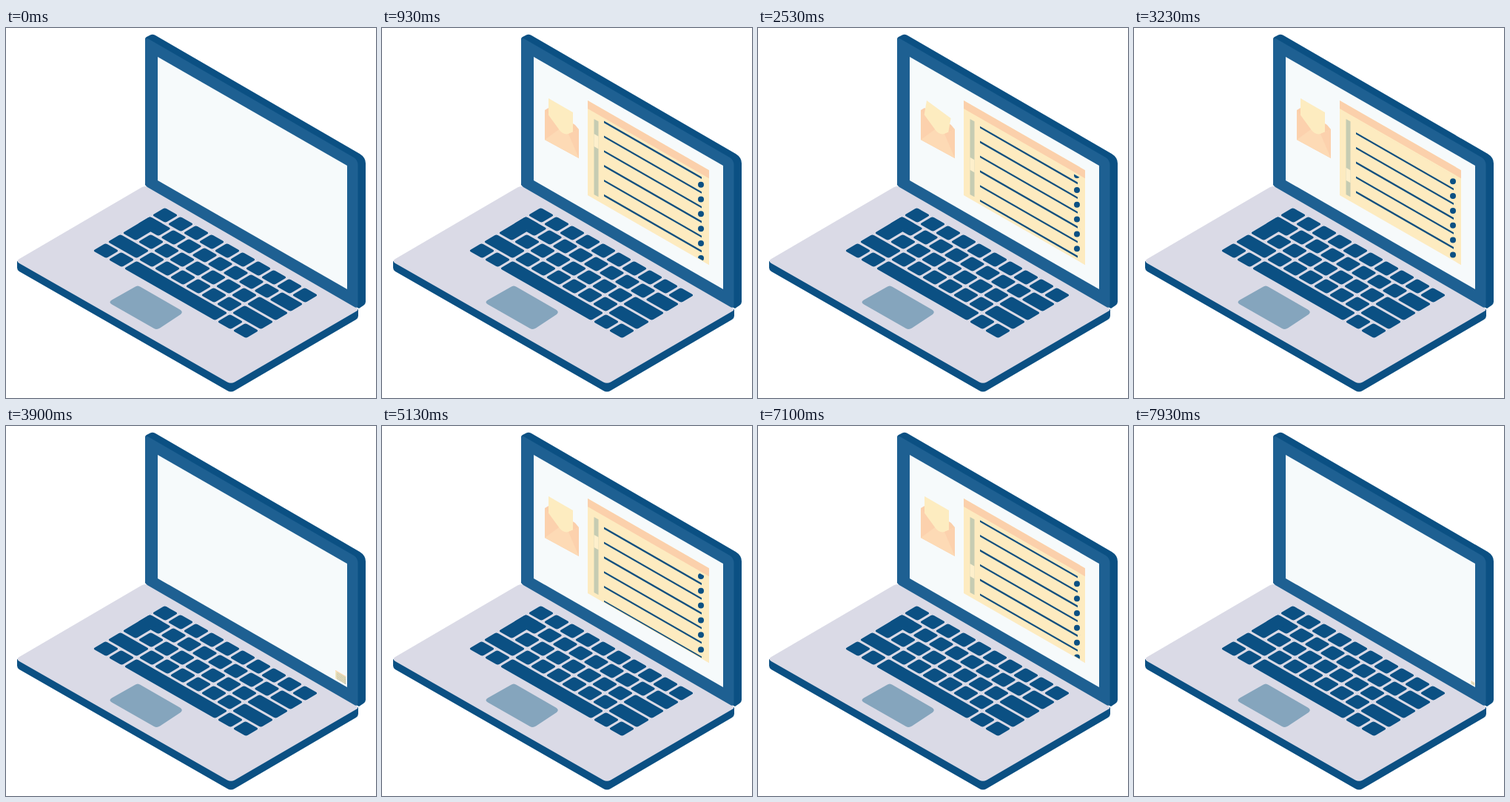
An HTML page for the animation above (8.01 s loop, 500 px wide and 500 px high).

```html
<!DOCTYPE html>
<html lang="en">
<head>
<meta charset="utf-8">
<title>Laptop mail</title>
<style>
  html, body { margin: 0; width: 100%; height: 100%; overflow: hidden; background: #fff; }
  svg { display: block; width: 100vw; height: 100vh; }
</style>
</head>
<body>
<svg viewBox="0 0 500 500">
  <defs>
    <clipPath id="listArea"><rect y="14" width="164" height="113"/></clipPath>
  </defs>

  <!-- base -->
  <path fill="#0b5083" d="M15 315L15 324Q15 327 18 329L299 490Q304 493 309 490L473 394Q476 392 476 389L476 380Z"/>
  <path fill="#dadae6" d="M183 215.500L18 312Q13 315 18 318L299 478.500Q304 481 309 478.500L473 383Q478 380.500 473 377.500L193 215.500Q188 212.500 183 215.500Z"/>

  <!-- lid -->
  <path fill="#0b5083" d="M188 15Q188 13 190 12L195 9.500Q198 8 202 10L478 170Q486 175 486 183L486 370Q486 373 483 375L477 379L188 212Z"/>
  <path fill="#1e6092" d="M188 17Q188 12 193 15L470 175Q475.500 178.500 475.500 185L475.500 374Q475.500 380 470 376.500L191 215Q188 213 188 210Z"/>
  <path fill="#f6fafb" d="M205 39L461 186V353L205 206Z"/>

  <g id="keys" fill="#0b5083"></g>
  <path fill="#85a5bd" d="M174 350Q178 347 182 350L235 380.500Q240 383.500 236 387L208 405.500Q204 408 200 406L143 373.500Q138 370.500 143 367.500Z"/>

  <g id="mail">
    <path fill="#fbcfaa" d="M220 111L225 108L261 131L266 137V176L220 151Z"/>
    <g id="letter" fill="#fdecc0"><rect x="-16.500" y="-17.500" width="33" height="37"/></g>
    <path fill="#fddab5" d="M220 111L239 137Q245 145 252 143L266 137V176L220 151Z"/>
    <path fill="#fcd1ad" d="M220 111L239 137L220 151ZM266 137L252 143L266 176Z"/>
  </g>

  <g id="panel">
    <g transform="matrix(1 .574 0 1 278 98)">
      <rect width="164" height="128" fill="#fdebc0"/>
      <rect x="8.500" y="20" width="6" height="102" fill="#c6ccb2"/>
      <rect id="thumb" x="8.500" width="6" height="17" fill="#fdefcb"/>
      <g clip-path="url(#listArea)"><g id="rows"></g></g>
      <rect width="164" height="11" fill="#fbd0ab"/>
    </g>
  </g>
</svg>
<script>
const LOOP = 8010, CYCLE = LOOP / 2, ROW = 19.85;
const el = id => document.getElementById(id);
const clamp = v => Math.max(0, Math.min(1, v));
const ramp = (t, a, b) => clamp((t - a) / (b - a));

function add(parent, tag, attrs) {
  const node = document.createElementNS('http://www.w3.org/2000/svg', tag);
  for (const k in attrs) node.setAttribute(k, attrs[k]);
  parent.append(node);
}

// keyboard: unit cells on the isometric grid
const keys = el('keys'), PAD = 0.075;
keys.setAttribute('transform', 'matrix(21 12 -20 12 214.500 241)');
function key(row, col, w = 1, h = 1) {
  add(keys, 'rect', {
    x: col + PAD, y: row + PAD, width: w - 2 * PAD, height: h - 2 * PAD, rx: 0.12
  });
}
function run(row, from, count) {
  for (let i = 0; i < count; i++) key(row, from + i);
}
run(0, 0, 10);
key(1, 0, 1.5); key(1, 0, 1, 2); run(1, 1.5, 7); key(1, 8.5, 1.5);
run(2, 1, 7); key(2, 8, 2);
key(3, 0, 2); run(3, 2, 6); key(3, 8, 2);
run(4, 0, 2); key(4, 2, 6); run(4, 8, 2);

// list rows: a dot above the end of each line
const rows = el('rows');
for (let i = 0; i < 8; i++) {
  const y = i * ROW;
  add(rows, 'path', { d: `M22 ${y}H154`, stroke: '#124f7e', 'stroke-width': 2.6 });
  add(rows, 'circle', {
    cx: 0, cy: 0, r: 4, fill: '#0b5083',
    transform: `matrix(1 -.574 0 1 153 ${y - 10.2})`
  });
}

function scaleAbout(node, x, y, s) {
  node.setAttribute('transform', `translate(${x} ${y}) scale(${s}) translate(${-x} ${-y})`);
  node.style.display = s > 0.005 ? '' : 'none';
}

function draw(time) {
  const t = time % LOOP % CYCLE;
  const panelScale = Math.min(ramp(t, 130, 800), 1 - ramp(t, 3490, 3940));
  const mailScale = Math.min(ramp(t, 300, 640), 1 - ramp(t, 3410, 3745));
  scaleAbout(el('panel'), 461, 352, panelScale);
  scaleAbout(el('mail'), 243, 138, mailScale);

  const since = t - 1125;
  el('thumb').setAttribute('y', 44 + 0.0199 * since);
  const shift = ((27.3 - 0.0451 * since) % ROW + ROW) % ROW;
  rows.setAttribute('transform', `translate(0 ${shift})`);

  const tilt = Math.sin(Math.PI * ramp(t, 1150, 2900));
  el('letter').setAttribute('transform',
    `matrix(1 .574 0 1 241.500 ${122 + 6 * tilt}) rotate(${15 * tilt})`);
}

const start = performance.now();
function tick() {
  draw(performance.now() - start);
  requestAnimationFrame(tick);
}
tick();
</script>
</body>
</html>
```
